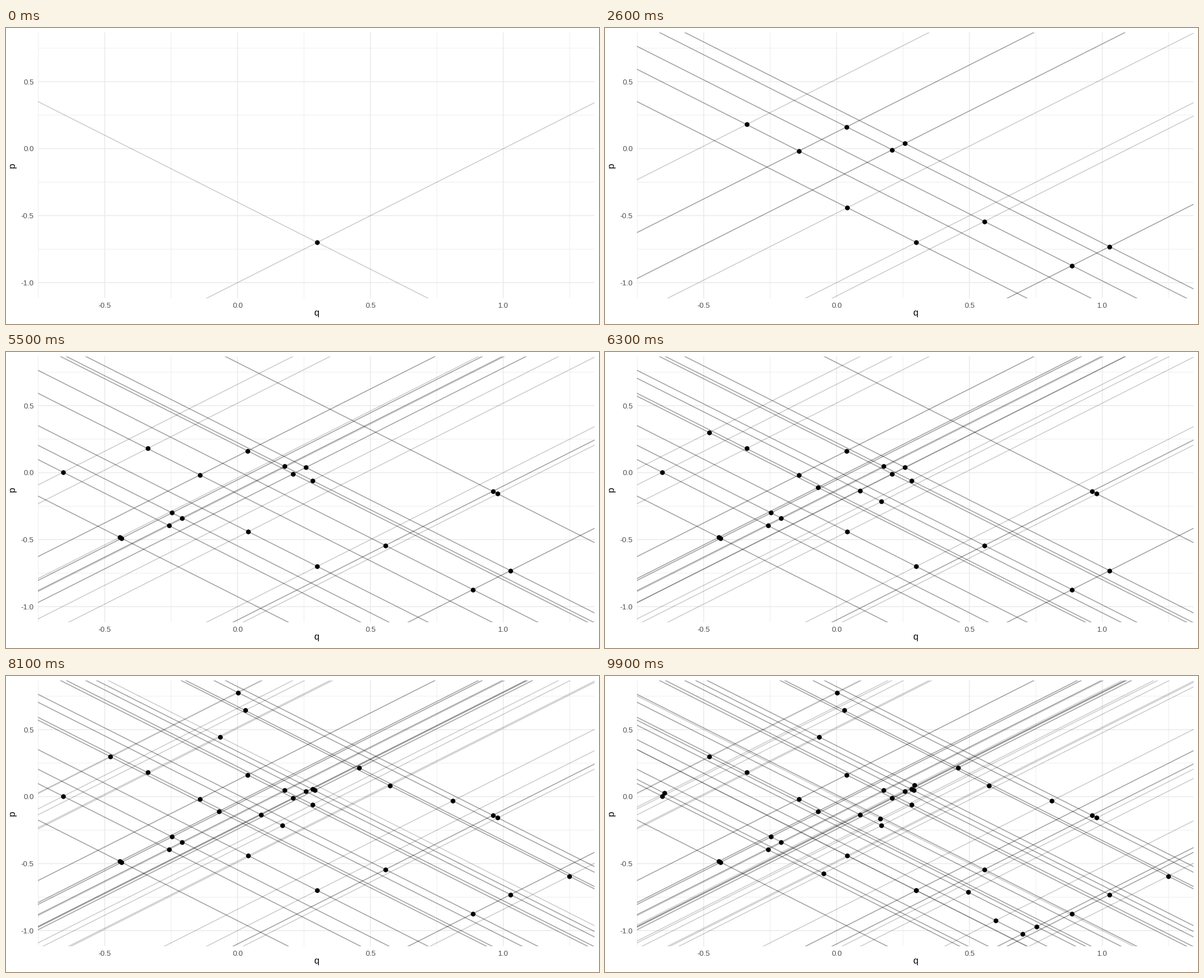
Animation, 1058 px wide and 529 px high, one loop 10 s. Source, as a matplotlib script:

```python
import numpy as np
import matplotlib
import matplotlib.pyplot as plt
from matplotlib.animation import FuncAnimation
from matplotlib.collections import LineCollection

W, H, DPI = 1058, 529, 100
PX = 72 / DPI                                    # one pixel in points
LEFT, RIGHT, TOP, BOTTOM = 57.0, 1049.75, 8.25, 482.5
X0, Y0, SX, SY = 413.2, 215.6, 474.1, 239.45     # origin and pixels per unit

matplotlib.rcParams["font.family"] = "Liberation Sans"

# Each row: intercept of the falling line shared by two successive points,
# then the intercepts of the rising lines through the first and the second.
PAIRS = [
    (-0.4000, -1.0000, -0.4810), (-0.1588, 0.5190, 0.1245),
    (0.2005, 0.1245, -0.2182), (0.2960, -0.2182, -1.7586),
    (0.0128, -1.7586, -1.0997), (0.8210, -1.0997, -1.1375),
    (-0.6536, -0.1375, 0.6593), (0.2230, -0.3407, -0.1300),
    (-0.5468, -0.1300, -0.0537), (-0.9260, -0.0537, -0.0395),
    (-0.1802, -0.0395, 0.7790), (-0.0465, -0.2210, -0.3848),
    (0.6721, 0.6152, -0.2428), (0.3366, -0.2428, -0.2260),
    (0.7783, 0.7740, -0.8410), (0.6546, -1.8410, -0.4903),
    (0.3801, 0.5097, -0.2075), (-0.2176, -1.2075, -1.7234),
    (-0.3257, -1.7234, -1.5236), (-0.6224, -0.5236, 0.6735),
    (0.0005, -0.3265, None),
]

# Tenths of a second at which each point joins the plot.
STARTS = [0, *range(2, 51, 3), 52, *range(55, 100, 2)]


def build_points():
    pts = []
    for fall, *rises in PAIRS:
        pts += [((fall - r) / 2, (fall + r) / 2) for r in rises if r is not None]
    return np.array(pts + [pts[0]])              # the walk ends where it began


def line_pair(q, p):
    """Rising and falling unit-slope lines through a point."""
    return [[(q - 4, p - 4), (q + 4, p + 4)], [(q - 4, p + 4), (q + 4, p - 4)]]


points = build_points()
segments = [s for q, p in points for s in line_pair(q, p)]

fig = plt.figure(figsize=(W / DPI, H / DPI), dpi=DPI, facecolor="white")
ax = fig.add_axes([LEFT / W, 1 - BOTTOM / H, (RIGHT - LEFT) / W, (BOTTOM - TOP) / H])
ax.set_xlim((LEFT - X0) / SX, (RIGHT - X0) / SX)
ax.set_ylim((Y0 - BOTTOM) / SY, (Y0 - TOP) / SY)
ax.axis("off")


def label(x, y, text, size, color, **kw):
    fig.text(x / W, 1 - y / H, text, fontsize=size * PX, color=color, **kw)


def grid(draw, values, width):
    for v in values:
        draw(v, color="#ebebeb", lw=width * PX, zorder=1, snap=False)


grid(ax.axvline, np.arange(-0.75, 1.3, 0.5), 0.85)
grid(ax.axhline, np.arange(-0.75, 0.8, 0.5), 0.85)
grid(ax.axvline, np.arange(-0.5, 1.1, 0.5), 1.6)
grid(ax.axhline, np.arange(-1.0, 0.6, 0.5), 1.6)

for v in (-0.5, 0.0, 0.5, 1.0):
    label(X0 + SX * v, 499.5, f"{v:.1f}", 13.2, "#4d4d4d", ha="center", va="baseline")
for v in (-1.0, -0.5, 0.0, 0.5):
    label(49.5, Y0 - SY * v + 4.7, f"{v:.1f}", 13.2, "#4d4d4d", ha="right", va="baseline")
label((LEFT + RIGHT) / 2, 514.2, "q", 16.5, "black", ha="center", va="baseline")
label(16.3, (TOP + BOTTOM) / 2, "p", 16.5, "black", rotation=90,
      rotation_mode="anchor", ha="center", va="baseline")

lines = LineCollection([], colors=[(0, 0, 0, 0.2)], linewidths=1.6 * PX, zorder=2)
ax.add_collection(lines, autolim=False)
dots, = ax.plot([], [], "o", color="black", ms=8.5 * PX, mew=0, zorder=3)


def update(frame):
    n = int(np.searchsorted(STARTS, frame, side="right"))
    lines.set_segments(segments[:2 * n])
    dots.set_data(points[:n, 0], points[:n, 1])
    return lines, dots


anim = FuncAnimation(fig, update, frames=100, interval=100, repeat=True,
                     repeat_delay=0, blit=False)
plt.show()
```
